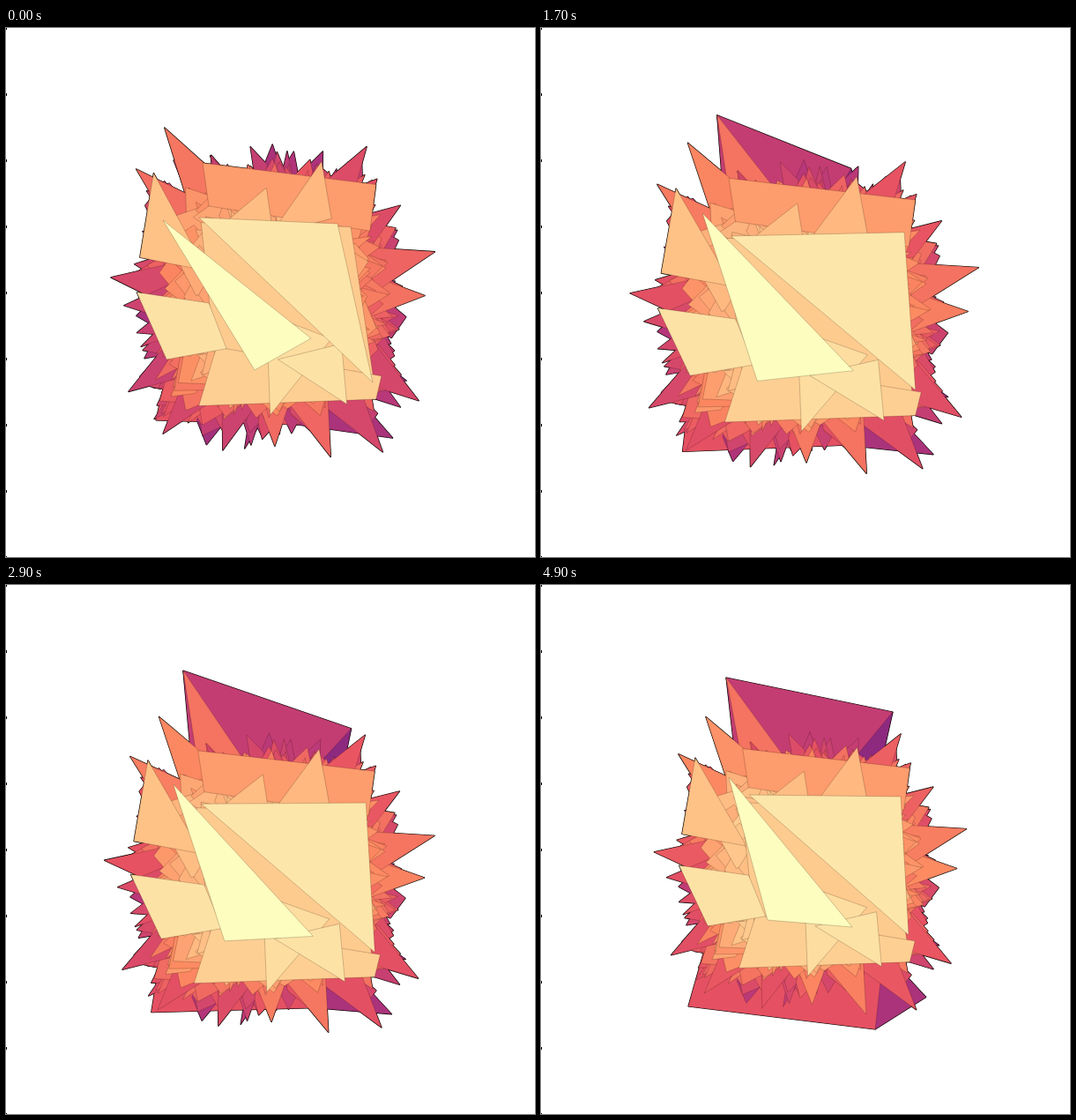
Write an HTML page with a canvas that moves like this. It is 600x600 px and loops after 5500 ms.

```html
<!DOCTYPE html>
<html>
<head>
<meta charset="utf-8">
<style>
  html, body { margin: 0; width: 100%; height: 100%; overflow: hidden; background: #fff; }
  canvas { display: block; width: 600px; height: 600px; }
</style>
</head>
<body>
<canvas width="600" height="600"></canvas>
<script>
const ctx = document.querySelector('canvas').getContext('2d');
const LOOP = 5500, STEP = 100, LAST = 49;
const CENTER = [297, 309], HALF = [176, 172];

// Key poses as scale and shift of x and y; the shapes are laid out in pose 1
const POSES = [[.87, 43, .94, 14], [1, 0, 1, 0], [.884, 35, .898, 56], [.839, 55, .849, 60]];

// Time in ms and pose: a quick opening, a swing back, then a slow settling
const PATH = [[0, 0], [400, .95], [1000, 1], [1700, 1.55], [2000, 1], [2200, 1.5],
  [2400, 1.85], [3000, 2], [4100, 2.75], [4900, 3]];

// Magma colour map
const MAGMA = [[0, 0, 4], [28, 16, 68], [81, 18, 124], [130, 37, 129], [183, 55, 121],
  [231, 82, 98], [252, 137, 97], [254, 196, 136], [252, 253, 191]];

const mix = (a, b, k) => a + (b - a) * k;

function magma(value) {
  const x = Math.max(0, Math.min(.999, value)) * 8, i = Math.floor(x);
  return `rgb(${MAGMA[i].map((c, j) => Math.round(mix(c, MAGMA[i + 1][j], x - i)))})`;
}

let seed = 11;
function rand() {
  seed = (seed * 1664525 + 1013904223) % 4294967296;
  return seed / 4294967296;
}

// Point of the rounded square body at an angle and relative radius
function polar(a, r) {
  const c = Math.cos(a), s = Math.sin(a);
  const q = r / Math.max(Math.abs(c), Math.abs(s)) ** .75;
  return [CENTER[0] + HALF[0] * q * c, CENTER[1] + HALF[1] * q * s];
}

// Kites pointing outwards, from the dark rim to the pale middle
function burrs(count) {
  return Array.from({ length: count }, (_, i) => {
    const u = i / count, a = rand() * 2 * Math.PI;
    const tip = 1.02 - .42 * u + (rand() - .6) * .16;
    const base = tip * (.78 + rand() * .12);
    const spread = .05 + rand() * (.06 + .2 * u);
    const lean = (rand() - .5) * .12;
    return {
      color: .43 + .43 * Math.sqrt(u) + (rand() - .5) * .07, shade: 1,
      pts: [polar(a, tip), polar(a + lean + spread, base), polar(a, .3), polar(a + lean - spread, base)]
    };
  });
}

// A long spike from a tip towards the centre
function spike(color, [x, y]) {
  const dx = CENTER[0] - x, dy = CENTER[1] - y, n = 28 / Math.hypot(dx, dy);
  const bx = x + dx * .4, by = y + dy * .4;
  return { color, shade: 1, pts: [[x, y], [bx - dy * n, by + dx * n], [bx + dy * n, by - dx * n]] };
}

const facet = (color, ...pts) => ({ color, pts });

const RED_TIPS = [[87, 286], [104, 320], [110, 424], [155, 475], [233, 495], [442, 497],
  [489, 435], [465, 199], [421, 128]];
const ORANGE_TIPS = [[157, 105], [120, 155], [301, 490], [497, 308], [510, 255], [374, 503]];

const kites = burrs(480), rim = 190;
// A vertex is a point moved by the pose, or four points of its own, one per key pose
const topLeft = [190, 150, 198, 101, 201, 97, 210, 105];
const topRight = [330, 180, 300, 155, 394, 163, 399, 144];
const lowLeft = [170, 445, 155, 475, 165, 485, 167, 478];
const lowRight = [330, 450, 340, 465, 350, 480, 379, 504];

const SHAPES = [
  facet(.4, topRight, [380, 230], [290, 220]),
  facet(.53, topLeft, topRight, [300, 230], [205, 230]),
  facet(.7, topLeft, [290, 195], [210, 185]),
  facet(.47, lowRight, [455, 480], [380, 400]),
  facet(.62, lowLeft, lowRight, [400, 400], [160, 400]),
  ...kites.slice(0, rim),
  ...RED_TIPS.map(p => spike(.57 + rand() * .05, p)),
  ...ORANGE_TIPS.map(p => spike(.68 + rand() * .05, p)),
  ...kites.slice(rim),
  facet(.79, [207, 148], [433, 174], [425, 230], [215, 200]),
  facet(.85, [362, 146], [375, 215], [295, 235]),
  facet(.86, [290, 178], [300, 240], [210, 240]),
  facet(.87, [143, 160], [212, 278], [125, 262]),
  facet(.89, [205, 220], [400, 225], [430, 410], [225, 400]),
  facet(.9, [202, 441], [225, 370], [440, 405], [433, 433]),
  facet(.94, [121, 304], [215, 317], [238, 372], [160, 385]),
  facet(.93, [295, 452], [290, 330], [375, 360]),
  facet(.94, [395, 439], [305, 385], [388, 366]),
  facet(.95, [219, 215, 207, 220, 222, 249, 236, 238], [376, 222, 417, 212, 408, 248, 408, 240],
    [416, 402, 433, 403, 418, 417, 417, 397]),
  facet(1, [178, 218, 175, 190, 190, 227, 213, 218], [282, 388, 242, 396, 248, 404, 257, 380],
    [346, 352, 362, 376, 348, 399, 353, 388])
];

function poseAt(t) {
  const i = PATH.findIndex(p => p[0] > t);
  if (i < 0) return 3;
  const [a, b] = [PATH[i - 1], PATH[i]];
  return mix(a[1], b[1], (t - a[0]) / (b[0] - a[0]));
}

function place(v, pose) {
  const i = Math.min(2, Math.floor(pose)), k = pose - i;
  if (v.length > 2) return [0, 1].map(j => mix(v[2 * i + j], v[2 * i + 2 + j], k));
  const [sx, tx, sy, ty] = POSES[i].map((p, j) => mix(p, POSES[i + 1][j], k));
  return [v[0] * sx + tx, v[1] * sy + ty];
}

function trace(pts) {
  ctx.beginPath();
  pts.forEach(p => ctx.lineTo(...p));
  ctx.closePath();
}

function draw(t) {
  ctx.fillStyle = '#fff';
  ctx.fillRect(0, 0, 600, 600);
  ctx.fillStyle = '#000';
  for (let y = 0; y <= 600; y += 75) ctx.fillRect(0, y - 1, 1, 3);

  const pose = poseAt(t);
  const shapes = SHAPES.map(({ color, shade = 0, pts }) => ({
    color: color + shade * .02 * (pose - 1),
    pts: pts.map(v => place(v, pose))
  }));

  // Dark silhouette first, then the faces with faint edges
  ctx.lineJoin = 'bevel';
  ctx.strokeStyle = '#000';
  ctx.lineWidth = 1.2;
  for (const s of shapes) {
    trace(s.pts);
    ctx.stroke();
  }
  ctx.strokeStyle = 'rgba(40, 10, 0, .35)';
  ctx.lineWidth = .6;
  for (const s of shapes) {
    trace(s.pts);
    ctx.fillStyle = magma(s.color);
    ctx.fill();
    ctx.stroke();
  }
}

const start = performance.now();
function tick() {
  const t = (performance.now() - start) % LOOP;
  draw(Math.min(LAST, Math.floor(t / STEP)) * STEP);
  requestAnimationFrame(tick);
}
tick();
</script>
</body>
</html>
```
